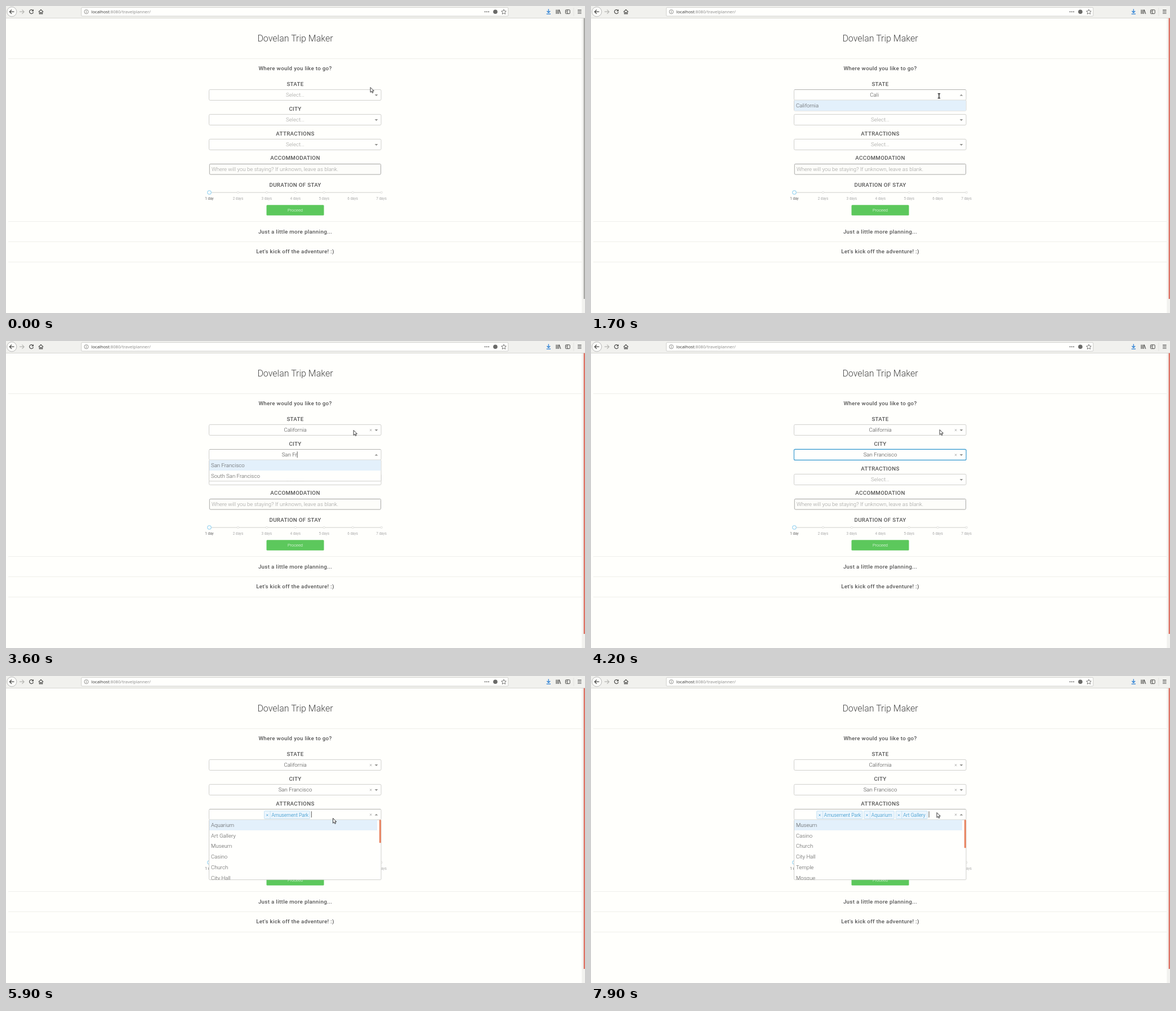
Animation of 1028x545 px, one loop 8 s. Source, as an HTML page:

```html
<!DOCTYPE html>
<html lang="en">
<head>
<meta charset="utf-8">
<title>Trip form</title>
<style>
  html, body { margin: 0; width: 100%; height: 100%; overflow: hidden; background: #fffffc; }
  svg { display: block; width: 100%; height: 100%; font-family: Roboto, sans-serif; }
  text { white-space: pre; }
  .title { font-size: 16px; font-weight: 300; fill: #444; }
  .head { font-size: 9.75px; font-weight: 500; letter-spacing: .32px; fill: #555; }
  .body { font-size: 9.63px; font-weight: 300; fill: #444; }
  .hint { fill: #9c9c9a; }
  .tag { font-size: 8.67px; font-weight: 300; fill: #1687c4; }
  .mark { font-size: 6.42px; fill: #aaa; }
  .button { font-size: 7.49px; font-weight: 300; fill: #fff; }
  .url { font-family: "Open Sans", sans-serif; font-size: 7.7px; fill: #888; }
  .mid { text-anchor: middle; }
</style>
</head>
<body>
<svg viewBox="0 0 1028 545" xmlns="http://www.w3.org/2000/svg">
  <g id="page"></g>
  <g id="live"></g>
</svg>
<script>
const LOOP = 8000, STEP = 100;
const LEFT = 360.5, WIDTH = 305.5, MID = 513.5, ROW = 18.8, MENU_MAX = 107;

const rect = (x, y, w, h, fill, more = '') =>
  `<rect x="${x}" y="${y}" width="${w}" height="${h}" fill="${fill}" ${more}/>`;
const text = (x, y, str, cls, more = '') => `<text x="${x}" y="${y}" class="${cls}" ${more}>${str}</text>`;
const path = (d, stroke, width = 1, fill = 'none') =>
  `<path d="${d}" stroke="${stroke}" stroke-width="${width}" fill="${fill}"/>`;
const circle = (x, y, r, fill, stroke = 'none', width = 1) =>
  `<circle cx="${x}" cy="${y}" r="${r}" fill="${fill}" stroke="${stroke}" stroke-width="${width}"/>`;

function toolbar() {
  const ink = '#4a4a48';
  return rect(0, 0, 1028, 21, '#f1f1ee') + rect(0, 21, 1028, .8, '#cfcfcb')
    + circle(10.3, 10.2, 8.6, '#fbfbf9', '#aaa', .8)
    + path('M14.5 10.2H6.5M10 6.6L6.4 10.2L10 13.8', ink, 1.3)
    + path('M24 10.2H32M28.5 6.6L32.1 10.2L28.5 13.8', '#b5b5b2', 1.2)
    + path('M47.6 7.6A3.5 3.5 0 1 0 48.5 11', ink, 1.2)
    + path('M49 5.8V9.4H45.4Z', 'none', 0, ink)
    + path('M57.8 10.4L62 6.4L66.2 10.4M59.3 9.8V14H61.2V11.4H62.8V14H64.7V9.8', ink, 1.1)
    + rect(133.8, 2.6, 757.8, 15.4, '#fffffd', 'rx="1.5" stroke="#c6c6c3" stroke-width=".8"')
    + circle(142.6, 10.2, 3.6, 'none', '#777', .8)
    + path('M142.6 9.6V12.2M142.6 7.9V8.8', '#777', .9)
    + text(151.5, 13, '<tspan fill="#333">localhost</tspan>:8080/travelplanner/', 'url')
    + [850.5, 853.7, 856.9].map(x => circle(x, 10.2, 1, '#666')).join('')
    + circle(868.8, 10.2, 3.8, '#6a6a68')
    + path('M883.8 6L885.1 8.9L888.2 9.2L885.9 11.3L886.5 14.4L883.8 12.8L881.1 14.4L881.7 11.3L879.4 9.2L882.5 8.9Z', '#666', .9)
    + path('M963.3 5.5V11.5M960.4 9L963.3 11.8L966.2 9M959.6 14.2H967', '#2a7fd4', 1.3)
    + path('M977 6.4V14M979.2 6.4V14M981.4 6.4V14M982.3 6.6L984.8 14', ink, 1.1)
    + rect(993.4, 6.8, 7.8, 6.8, 'none', `rx="1" stroke="${ink}"`)
    + path('M996.9 6.8V13.6M994.6 8.8H996M994.6 10.8H996', ink, .9)
    + path('M1008 3V18', '#dcdcd8', .7)
    + path('M1015 7.4H1021.6M1015 10.2H1021.6M1015 13H1021.6', ink, 1.1);
}

function slider() {
  const x = i => 361 + i * 50.92;
  const days = [0, 1, 2, 3, 4, 5, 6];
  return rect(361, 330.2, 305.5, 1.7, '#e3e3e0', 'rx=".8"')
    + days.map(i => circle(x(i), 331, 1.7, '#fffffd', '#dededb', .9)
      + text(x(i), 344, `${i + 1} day${i ? 's' : ''}`, 'mark mid', i ? '' : 'style="fill:#666"')).join('')
    + circle(361, 331, 3.2, '#fffffd', '#8fd0f0', 1.1);
}

function page() {
  const heads = [[114, 'Where would you like to go?'], [141.6, 'STATE'], [185.5, 'CITY'], [229.6, 'ATTRACTIONS'],
    [273, 'ACCOMMODATION'], [320.7, 'DURATION OF STAY'], [404, 'Just a little more planning...'],
    [439.3, "Let's kick off the adventure! :)"]];
  return rect(0, 0, 1028, 545, '#fffffc') + rect(1022.3, 21, 6, 524, '#f2f2ef') + toolbar()
    + text(MID, 63, 'Dovelan Trip Maker', 'title mid')
    + [93, 382.3, 418, 454].map(y => rect(4, y, 1018, .8, '#ebebe7')).join('')
    + heads.map(([y, s]) => text(MID, y, s, 'head mid')).join('')
    + rect(361.3, 280.3, 304.2, 18.8, '#fdfdfa', 'rx="2" stroke="#a0a09d" stroke-width=".9"')
    + rect(362, 280.9, 302.8, 1.2, '#ecece9')
    + text(365, 293.2, 'Where will you be staying? If unknown, leave as blank.', 'body hint')
    + slider()
    + rect(462.5, 353.3, 102, 18.5, '#5cc85c', 'rx="1.5"')
    + text(MID, 365, 'Proceed', 'button mid');
}

const names = s => s.split('|');
const states = names('Alabama|Alaska|Arizona|Arkansas|California|Colorado');
const cStates = names('California|Colorado|Connecticut|District of Columbia|Kentucky|Massachusetts');
const caStates = names('California|North Carolina|South Carolina');
const saCities = names('Azusa|Blackhawk-Camino Tassajara|Calabasas|Calimesa|Casa de Oro-Mount Helix|Costa Mesa');
const sanCities = names('East San Gabriel|San Bernardino|San Bruno|San Carlos|San Clemente|San Diego');
const sanFCities = names('San Felipe|San Fernando|San Fernando Valley|San Francisco|South San Francisco');
const sights = names('Amusement Park|Aquarium|Art Gallery|Museum|Casino|Church|City Hall|Temple|Mosque');
const tagWidths = [81, 53.5, 56];

const typed = (query, list, thumb = 0, caret = true) => ({ query, list, thumb, caret });
const picked = (value, focus) => ({ value, focus });
const tagged = (tags, thumb = 0, caret = false) =>
  ({ tags, thumb, caret, focus: !thumb, list: thumb ? sights.slice(tags, tags + 6) : null });

// Each track holds [start time, state]; a state lasts until the next one.
const fields = [
  { y: 148, track: [[0, {}], [700, typed('', states, 12)], [1200, typed('C', cStates, 50)],
    [1300, typed('Ca', caStates)], [1500, typed('Cal', ['California'])], [1600, typed('Cali', ['California'])],
    [1700, typed('Cali', ['California'], 0, false)], [1800, picked('California', true)],
    [2400, picked('California')]] },
  { y: 192, track: [[0, {}], [2400, { focus: true }], [2900, typed('Sa', saCities, 8)],
    [3100, typed('San', sanCities, 15)], [3200, typed('San ', sanCities.slice(0, 6), 18)],
    [3400, typed('San F', sanFCities)], [3600, typed('San Fr', sanFCities.slice(3))],
    [3700, typed('San Fra', sanFCities.slice(3))], [3800, picked('San Francisco', true)],
    [4700, picked('San Francisco')]] },
  { y: 236, track: [[0, {}], [4700, typed('', sights.slice(0, 6), 38)], [5400, tagged(1)],
    [5800, tagged(1, 41, true)], [6300, tagged(2)], [6700, tagged(2, 45)],
    [7200, tagged(3)], [7900, tagged(3, 50, true)]] }
];

const pointer = [[0, 'A', 646.5, 144], [200, 'A', 636, 149], [300, 'A', 623.5, 155], [500, 'I', 617.4, 159.6],
  [900, 'I', 617.9, 159.6], [1800, 'A', 616.6, 158], [4200, 'A', 618.6, 157], [4300, 'A', 640, 147],
  [4400, 'A', 674, 135.5], [4500, 'A', 662, 175], [4600, 'A', 637, 220], [4700, 'I', 624, 246.5],
  [4900, 'A', 580, 257], [5000, 'A', 544, 270], [5200, 'A', 545, 270], [5500, 'A', 555, 262],
  [5600, 'A', 576, 252], [5700, 'I', 600, 246], [5900, 'A', 580, 252], [6000, 'A', 560, 256],
  [6100, 'A', 548, 259], [6200, 'A', 545, 259], [6500, 'A', 585.5, 250], [6700, 'I', 603, 246],
  [6900, 'A', 560, 256], [7000, 'A', 538, 263], [7300, 'A', 541, 262], [7400, 'A', 548, 259],
  [7500, 'A', 562, 255], [7600, 'A', 582, 250], [7700, 'A', 601, 246], [7800, 'A', 613.5, 242]];

const at = (track, t) => track.filter(key => key[0] <= t).pop();
const cross = (x, y, r, color) =>
  path(`M${x - r} ${y - r}L${x + r} ${y + r}M${x + r} ${y - r}L${x - r} ${y + r}`, color, .8);
const caretAt = (x, y) => rect(x, y + 4.2, .8, 11, '#333');

const ruler = document.createElement('canvas').getContext('2d');
function textWidth(str) {
  ruler.font = '300 9.63px Roboto, sans-serif';
  return ruler.measureText(str).width;
}

function tagRow(count, y, caret) {
  const widths = tagWidths.slice(0, count);
  let x = 499 - (widths.reduce((a, b) => a + b, 0) + 3 * (count - 1)) / 2;
  let out = '';
  widths.forEach((w, i) => {
    out += rect(x, y + 3.5, w, 14, '#ebf5fd', 'rx="1" stroke="#b9dcf1" stroke-width=".8"')
      + rect(x + 10.2, y + 3.5, .7, 14, '#b9dcf1')
      + cross(x + 5.3, y + 11, 1.5, '#3c9bd0')
      + text(x + 13, y + 14, sights[i], 'tag');
    x += w + 3;
  });
  return out + (caret ? caretAt(x - .6, y) : '');
}

function control(y, s) {
  const open = !!s.list, query = s.query || '';
  const frame = `rx="2" stroke="${s.focus ? '#3a9ccf' : '#cbcbc8'}" stroke-width="${s.focus ? 1.1 : .9}"`;
  let out = s.focus ? rect(LEFT - .9, y - .5, WIDTH + 1.8, 20.8, '#cfe8f5', 'rx="2.5"') : '';
  out += rect(LEFT, y + .4, WIDTH, 19, '#fffffd', frame);
  if (open) out += rect(LEFT + .8, y, WIDTH - 1.6, .9, '#b3b3b0');
  if (s.tags) out += tagRow(s.tags, y, s.caret);
  else if (s.value) out += text(MID, y + 12.6, s.value, 'body mid');
  else {
    if (!query) out += text(MID, y + 12.6, 'Select...', 'body hint mid');
    const w = textWidth(query), x = query ? 503.2 - w / 2 : 506;
    out += text(x, y + 13, query, 'body');
    if (s.caret) out += caretAt(x + (query ? w : 0), y);
  }
  if (s.tags || s.value) out += cross(647.6, y + 10.2, 1.7, '#999');
  const tip = open ? `M654.7 ${y + 11.6}h5.6l-2.8 -2.9z` : `M654.7 ${y + 9}h5.6l-2.8 2.9z`;
  return out + path(tip, 'none', 0, '#8e8e8b');
}

function menu(y, s) {
  if (!s.list) return '';
  const top = y + 19.2, h = Math.min(s.list.length * ROW, MENU_MAX - .5);
  const clip = `clip${y}`;
  const rows = s.list.map((name, i) => text(364, top + 12.5 + i * ROW, name, 'body', 'style="fill:#555"')).join('');
  return `<clipPath id="${clip}">${rect(LEFT, top, WIDTH, h, '#000')}</clipPath>`
    + rect(LEFT, top, WIDTH, h, '#fffffd', 'rx="1.5" stroke="#cbcbc8" stroke-width=".9"')
    + `<g clip-path="url(#${clip})">`
    + rect(LEFT + .5, top, s.thumb ? 298 : WIDTH - 1, ROW, '#e3f0fb') + rows
    + (s.thumb ? rect(662.8, top, 3, s.thumb, '#e8825f') : '') + '</g>';
}

function cursor([, kind, x, y]) {
  if (kind === 'I') {
    return path(`M${x - 2.2} ${y - 4}h4.4M${x - 2.2} ${y + 4}h4.4M${x} ${y - 4}v8`, '#222', 1.4);
  }
  return path(`M${x + .5} ${y + .5}v8.8l2 -1.9l1.5 3l1.4 -.7l-1.4 -2.9h2.8z`, '#222', .9, '#fff');
}

const live = document.getElementById('live');
document.getElementById('page').innerHTML = page();

function draw(t) {
  const now = fields.map(f => [f.y, at(f.track, t)[1]]);
  live.innerHTML = rect(1025.6, 21.5, 2.4, 498.5, t < 500 ? '#a9a9a6' : '#dd7365')
    + now.map(([y, s]) => control(y, s)).join('')
    + now.map(([y, s]) => menu(y, s)).join('')
    + cursor(at(pointer, t));
}

const start = performance.now();
let shown = -1;
function tick() {
  const t = Math.floor((performance.now() - start) % LOOP / STEP) * STEP;
  if (t !== shown) draw(shown = t);
  requestAnimationFrame(tick);
}
tick();
</script>
</body>
</html>
```
